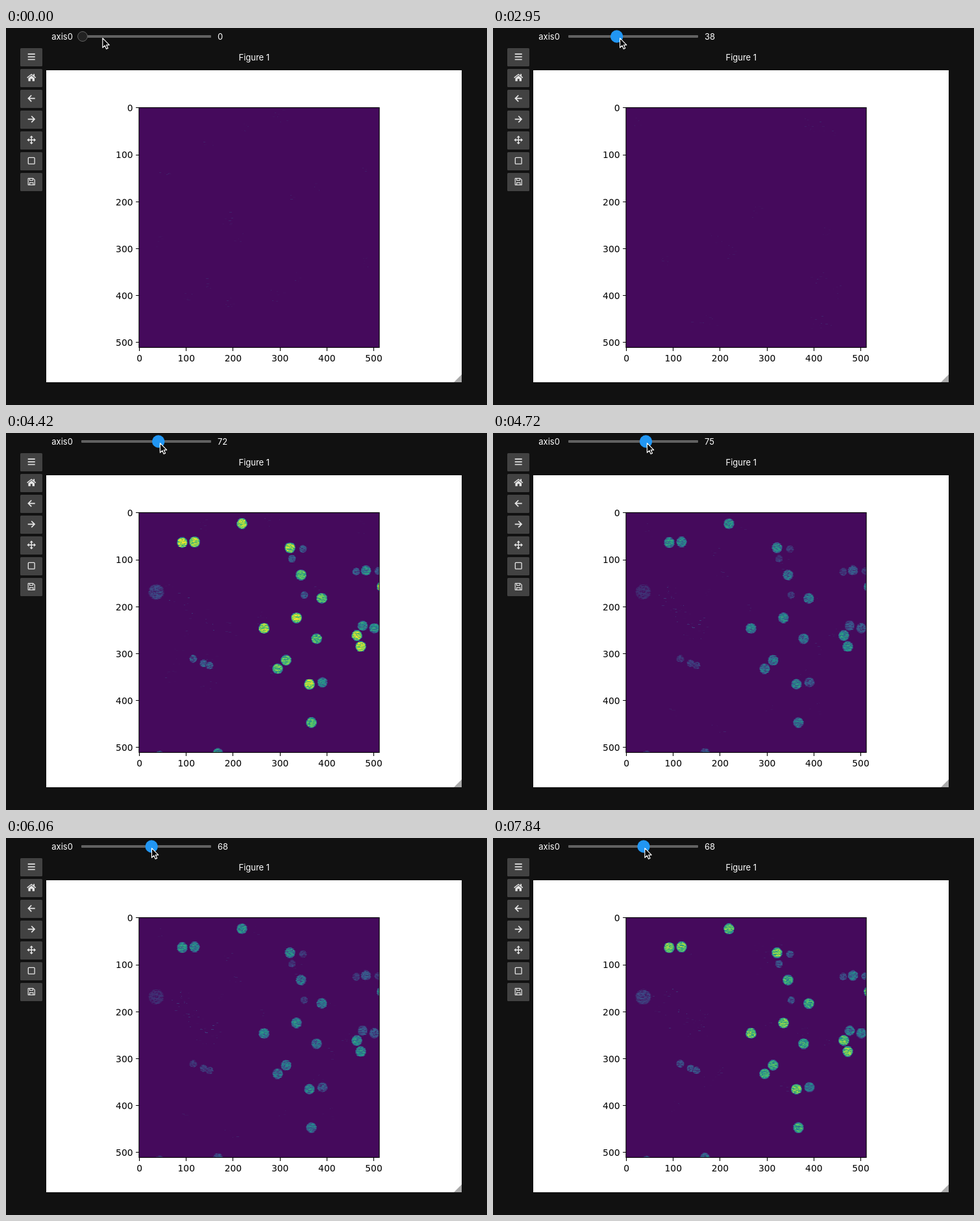
An HTML page with a canvas that plays this animation: 741 by 580 pixels, repeating every 7990 ms.

```html
<!DOCTYPE html>
<html lang="en">
<head>
<meta charset="utf-8">
<title>Image stack viewer</title>
<style>
  html, body { margin: 0; width: 100%; height: 100%; overflow: hidden; background: #111; }
  #stage { position: relative; width: 741px; height: 580px; overflow: hidden; background: #111; }
  #stage > * { position: absolute; }
  canvas, #stage > svg { left: 0; top: 0; }
  .figure { left: 62px; top: 65px; width: 640px; height: 480px; background: #fff; }
  .ui { font: 13px Inter, Roboto, sans-serif; fill: #fff; }
  .ticks { font: 13.89px "DejaVu Sans", sans-serif; fill: #000; stroke: none; }
  .icon { fill: none; stroke: #e6e6e6; stroke-width: 1.7; }
  .icon .solid { fill: #e6e6e6; stroke: none; }
</style>
</head>
<body>
<div id="stage">
  <div class="figure"></div>
  <canvas id="view" width="741" height="580"></canvas>
  <svg width="741" height="580" viewBox="0 0 741 580">
    <g id="buttons"></g>
    <g id="axes" stroke="#000" stroke-width="1.1" fill="none">
      <rect x="204.9" y="122.5" width="370.2" height="369"/>
    </g>
    <path d="M702 533V545H690Z" fill="#aaa"/>
    <g class="ui">
      <text x="70.3" y="18">axis0</text>
      <text x="382.3" y="50" text-anchor="middle">Figure 1</text>
      <text id="value" x="326" y="18">0</text>
    </g>
    <rect x="116" y="11" width="200" height="4" rx="1" fill="#616161"/>
    <circle id="handle" cy="13"/>
    <path id="cursor" d="M0 0V14.6L3.4 11.4L5.7 16.6L8.1 15.5L5.8 10.5H10.3Z"
      fill="#000" stroke="#fff" stroke-width="1.2" stroke-linejoin="round"/>
  </svg>
</div>
<script>
const LOOP = 7990, STEPS = 54, HOME = 118, PX_PER_SLICE = 1.56;
const $ = id => document.getElementById(id);
const clamp = u => Math.min(1, Math.max(0, u));

// Drags of the slider handle: first step, last step, x reached
const DRAGS = [[5, 30.5, 235.5], [33, 36, 231], [36.5, 39.5, 224.2], [41, 42, 221], [50, 53, 232]];
const ease = u => .7 * u * u * (3 - 2 * u) + .3 * u;
const handleX = k => DRAGS.reduce((x, [a, b, to]) => x + (to - x) * ease(clamp((k - a) / (b - a))), HOME);
const sliceAt = k => Math.floor((handleX(k) - HOME) / PX_PER_SLICE + .338);

// Nuclei by brightness
const NUCLEI = [
  { level: .93, r: 8.8, at: [[363, 139], [271, 168], [290, 167], [437, 176], [447, 284], [397, 300],
    [540, 311], [546, 328], [467, 386], [579, 236]] },
  { level: .77, r: 8.8, at: [[454, 218], [486, 254], [478, 316], [431, 349], [418, 362], [470, 445]] },
  { level: .54, r: 8.5, at: [[549, 296], [567, 300], [487, 383], [326, 492], [554, 211]] },
  { level: .33, r: 6.5, at: [[457, 178], [440, 193], [459, 249], [236, 494], [539, 213], [573, 212],
    [288, 347], [304, 354], [313, 357]] },
  { level: .24, r: 13, at: [[231, 244]] }
];

const VIRIDIS = [[69, 8, 90], [59, 82, 139], [33, 145, 140], [94, 201, 98], [253, 231, 37]];
function viridis(v) {
  const p = Math.min(3.999, Math.max(0, v) * 4), i = Math.floor(p);
  return `rgb(${VIRIDIS[i].map((c, j) => Math.round(c + (VIRIDIS[i + 1][j] - c) * (p - i)))})`;
}

function seeded(s) {
  return () => {
    s = s + 0x6D2B79F5 | 0;
    let t = Math.imul(s ^ s >>> 15, 1 | s);
    t = t + Math.imul(t ^ t >>> 7, 61 | t) ^ t;
    return ((t ^ t >>> 14) >>> 0) / 4294967296;
  };
}

const ctx = $('view').getContext('2d');
ctx.beginPath();
ctx.rect(205, 122, 370, 370);
ctx.clip();

function dash(x, y, w, v) {
  ctx.fillStyle = viridis(v);
  ctx.fillRect(Math.round(x), Math.round(y), w, 1);
}

function drawNucleus(cx, cy, r, level, rnd) {
  const rough = .3 + .6 * (1 - level);
  for (let y = Math.ceil(cy - r); y <= cy + r; y++) {
    const row = .82 + .18 * rnd(), edge = r + rnd() - .5;
    let grain = 1, left = 0;
    for (let x = Math.ceil(cx - r); x <= cx + r; x++) {
      if (left-- <= 0) {
        grain = 1 - rough * rnd() ** 1.5;
        left = Math.floor(rnd() * 4);
      }
      const d = ((x - cx) ** 2 + (y - cy) ** 2) / edge ** 2;
      const v = 1.2 * level * row * grain * Math.min(1, (1 - d) * 2.4);
      if (v > .04) dash(x, y, 1, v);
    }
  }
}

function cluster(x, y, spread, count, max, rnd) {
  for (let i = 0; i < count; i++) {
    const dx = (rnd() + rnd() - 1) * spread, dy = (rnd() + rnd() - 1) * spread;
    dash(x + dx, y + dy, 1 + Math.floor(rnd() * 4), .02 + max * rnd() ** 2);
  }
}

function drawSlice(z) {
  const rnd = seeded(z * 977 + 5), glow = Math.exp(-Math.abs(z - 67.3) / 8);
  ctx.fillStyle = '#450a5c';
  ctx.fillRect(205, 122, 370, 370);
  for (let i = 0; i < 16; i++) {
    cluster(215 + rnd() * 340, 132 + rnd() * 325, 14, 2 + rnd() * 5, .07, rnd);
  }
  if (glow < .05) return;
  // Loose haze running down to the right, stronger away from the focus
  for (let i = 0; i < 3; i++) {
    cluster(268 + 24 * i, 250 + 24 * i, 24, 24 * (1.2 - glow), .16, rnd);
  }
  for (const { level, r, at } of NUCLEI) {
    for (const [x, y] of at) drawNucleus(x, y, r, level * glow, rnd);
  }
}

function buildAxes() {
  let out = '', labels = '';
  for (let v = 0; v <= 500; v += 100) {
    const d = (v + .5) * .721875, x = 205.2 + d, y = 122.6 + d;
    const px = Math.floor(x) + .5, py = Math.floor(y) + .5;
    out += `<path d="M${px} 492V497M205 ${py}H200"/>`;
    labels += `<text x="${x}" y="513" text-anchor="middle">${v}</text>` +
      `<text x="195.6" y="${Math.round(y + 5.2)}" text-anchor="end">${v}</text>`;
  }
  $('axes').innerHTML += out + `<g class="ticks">${labels}</g>`;
}

function buildButtons() {
  const arrow = 'M5.5 0H-4.5M0 -4.8L-4.8 0L0 4.8';
  const tip = 'M0 -6.8L2.7 -3.7H-2.7Z';
  const icons = [
    '<path d="M-5.5 -4.2H5.5M-5.5 0H5.5M-5.5 4.2H5.5"/>',
    '<path class="solid" d="M0 -3L4.8 1V5.5H1.4V2H-1.4V5.5H-4.8V1Z"/>' +
      '<path class="solid" d="M3 -5.5H4.8V-2H3Z"/><path d="M-6.6 .3L0 -5L6.6 .3" stroke-width="1.4"/>',
    `<path d="${arrow}"/>`,
    `<path d="${arrow}" transform="scale(-1 1)"/>`,
    '<path d="M0 -5V5M-5 0H5" stroke-width="1.5"/>' +
      [0, 90, 180, 270].map(a => `<path class="solid" d="${tip}" transform="rotate(${a})"/>`).join(''),
    '<rect x="-4.9" y="-4.9" width="9.8" height="9.8" rx="1" stroke-width="1.3"/>',
    '<path d="M-5 -5H2.6L5 -2.6V5H-5Z" stroke-width="1.2" stroke-linejoin="round"/>' +
      '<path d="M-2.7 -5V-1.8H2V-5M-2.7 5V1.6H2.7V5" stroke-width="1.1"/>'
  ];
  $('buttons').innerHTML = icons.map((icon, i) =>
    `<rect x="22" y="${31 + 32 * i}" width="34" height="28" rx="1.5" fill="#424242"/>` +
    `<g class="icon" transform="translate(39.2 ${44.3 + 32 * i})">${icon}</g>`).join('');
}

function setHandle(x, active) {
  const h = $('handle');
  h.setAttribute('cx', x);
  h.setAttribute('r', active ? 9.7 : 7.5);
  h.setAttribute('fill', active ? '#2196f3' : '#222');
  h.setAttribute('stroke', active ? 'none' : '#616161');
}

let shownStep = -1, shownSlice = -1;
function render(t) {
  const k = Math.min(STEPS - 1, Math.floor(t / LOOP * STEPS + .15));
  if (k === shownStep) return;
  shownStep = k;
  setHandle(handleX(k), k >= 3);
  // The pointer glides in, then runs half a step ahead of the handle
  const approach = 29 * (1 - clamp(k / 4));
  $('cursor').setAttribute('transform', `translate(${handleX(k + .5) + approach + 1.9} 15.6)`);
  // The readout trails the handle by two steps, the picture by four
  $('value').textContent = sliceAt(k - 2);
  const z = sliceAt(k - 4);
  if (z !== shownSlice) drawSlice(shownSlice = z);
}

buildAxes();
buildButtons();
const start = performance.now();
function tick() {
  render((performance.now() - start) % LOOP);
  requestAnimationFrame(tick);
}
tick();
</script>
</body>
</html>
```
